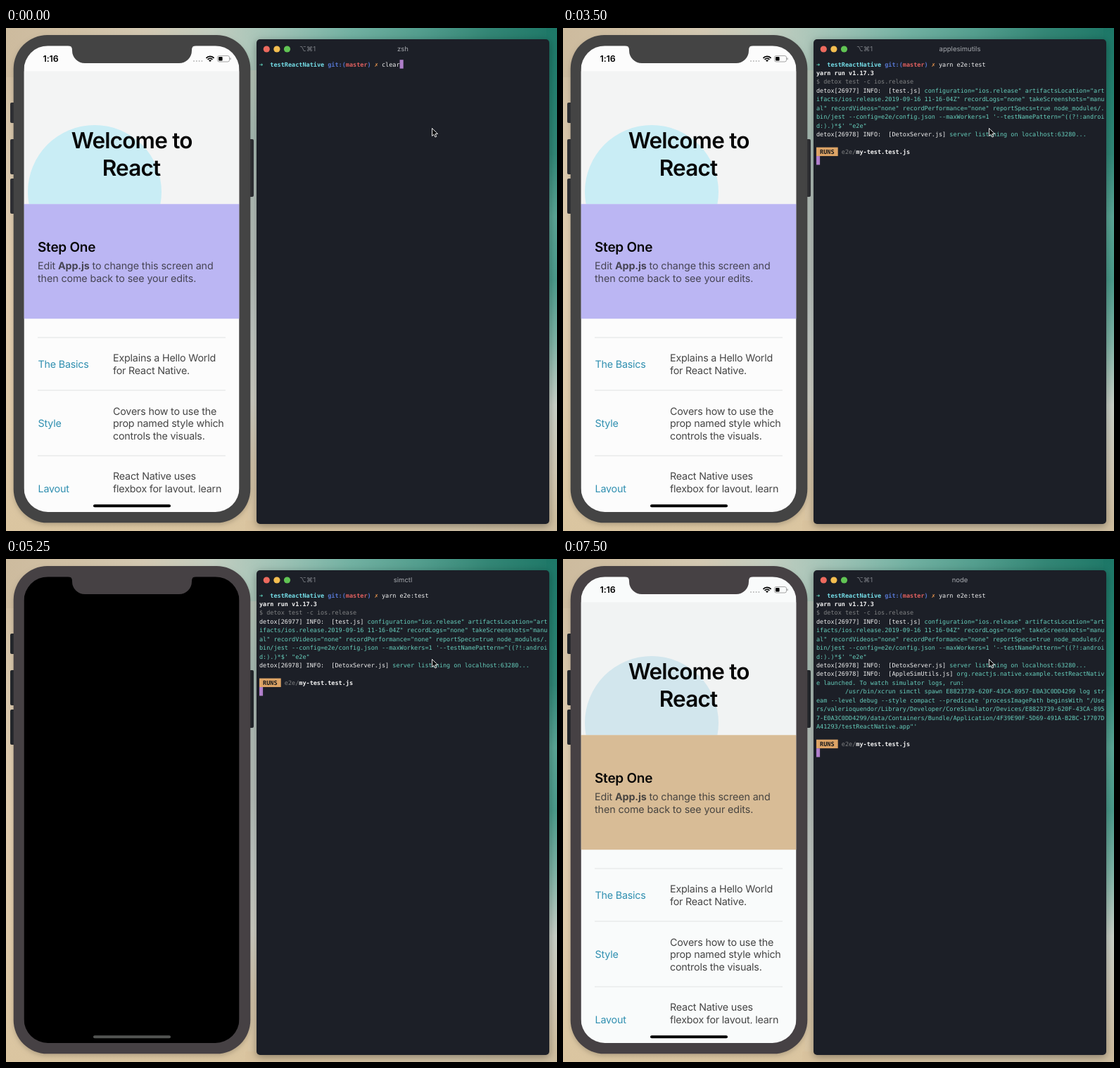
Animation of 783x715 px, one loop 8 s. Source, as an HTML page with a canvas:

```html
<!DOCTYPE html>
<html lang="en">
<head>
<meta charset="utf-8">
<title>End-to-end test run</title>
<style>
html, body { margin: 0; width: 100%; height: 100%; overflow: hidden; background: #d9c6a8; }
canvas { display: block; }
</style>
</head>
<body>
<canvas id="stage" width="783" height="715"></canvas>
<script>
const ctx = document.getElementById('stage').getContext('2d');
const LOOP = 8000;
const SANS = 'Inter, "Open Sans", sans-serif';
const MONO = '"DejaVu Sans Mono", monospace';
const COL = 5.117, ROW = 12.44, LEFT = 360, TOP = 45.2;
const SCREEN = { x: 25.5, y: 25.2, w: 306, h: 662.7 };
const C = {
  white: '#f0f0f0', teal: '#66cdbb', gray: '#7f8082', cursor: '#b07fcb',
  panel: '#1c1f27', badge: '#dda466'
};

// Last value whose start time has been reached.
const at = (steps, t) => steps.filter(([start]) => start <= t).pop()[1];

function gradient(x0, y0, x1, y1, colors) {
  const g = ctx.createLinearGradient(x0, y0, x1, y1);
  colors.forEach((c, i) => g.addColorStop(i / (colors.length - 1), c));
  return g;
}

function rect(x, y, w, h, fill, radius = 0) {
  ctx.fillStyle = fill;
  ctx.beginPath();
  ctx.roundRect(x, y, w, h, radius);
  ctx.fill();
}

// Full-width band of the phone screen.
const band = (y, h, fill) => rect(SCREEN.x, y, SCREEN.w, h, fill);

function disc(x, y, r, fill) {
  ctx.fillStyle = fill;
  ctx.beginPath();
  ctx.arc(x, y, r, 0, Math.PI * 2);
  ctx.fill();
}

function poly(fill, ...pts) {
  ctx.fillStyle = fill;
  ctx.beginPath();
  pts.forEach(([x, y]) => ctx.lineTo(x, y));
  ctx.closePath();
  ctx.fill();
}

function text(str, x, y, size, color, { weight = 400, spacing = 0, align = 'left', family = SANS } = {}) {
  ctx.font = `${weight} ${size}px ${family}`;
  ctx.letterSpacing = spacing + 'px';
  ctx.textAlign = align;
  ctx.fillStyle = color;
  ctx.fillText(str, x, y);
  return x + ctx.measureText(str).width;
}

function withShadow(blur, alpha, draw) {
  ctx.save();
  ctx.shadowColor = `rgba(0,0,0,${alpha})`;
  ctx.shadowBlur = blur;
  ctx.shadowOffsetY = 3;
  draw();
  ctx.restore();
}

function clipped(x, y, w, h, radius, draw) {
  ctx.save();
  ctx.beginPath();
  ctx.roundRect(x, y, w, h, radius);
  ctx.clip();
  draw();
  ctx.restore();
}

function drawBeach() {
  rect(0, 0, 783, 715, gradient(0, 0, 0, 715, ['#cdbb9e', '#d9c7ab', '#e0ccae', '#dfcaa9', '#dac5a0']));
  rect(0, 0, 783, 70, gradient(0, 0, 783, 0,
    ['#cdbb9e', '#d0c0a5', '#d3c8b2', '#c2cdc0', '#9dc2b5', '#72b1a2', '#539e8e', '#338675', '#1d7767']));
  rect(344, 60, 14, 655, gradient(0, 60, 0, 715,
    ['#bccabd', '#adc2b9', '#b8c4be', '#bcc4bf', '#c8cfca', '#d5d5cb', '#d9c9ae', '#dac5a1']));
  rect(768, 0, 15, 715, gradient(0, 0, 0, 715,
    ['#1d7767', '#24806f', '#318777', '#5aa595', '#4b9b8b', '#80b5a7', '#c9d0c7', '#d1c8b4', '#cfbd9c']));
  rect(340, 700, 443, 15, gradient(340, 0, 783, 0, ['#d9c39e', '#d8c4a2', '#d3c4a8', '#cfbea0']));
}

function drawWifi(x, y) {
  ctx.strokeStyle = '#000';
  ctx.lineWidth = 1.7;
  for (const r of [4.6, 7.6]) {
    ctx.beginPath();
    ctx.arc(x, y, r, -Math.PI * 0.76, -Math.PI * 0.24);
    ctx.stroke();
  }
  ctx.beginPath();
  ctx.moveTo(x, y);
  ctx.arc(x, y, 2.6, -Math.PI * 0.76, -Math.PI * 0.24);
  ctx.fillStyle = '#000';
  ctx.fill();
}

function drawStatusBar() {
  text('1:16', 52.5, 48, 12.4, '#000', { weight: 600, spacing: -0.1 });
  for (let i = 0; i < 4; i++) disc(267 + i * 3.8, 47, 1, '#b8b8b8');
  drawWifi(290, 48);
  ctx.strokeStyle = '#9a9a9a';
  ctx.lineWidth = 0.9;
  ctx.beginPath();
  ctx.roundRect(300.5, 39.5, 17, 8.5, 2.4);
  ctx.stroke();
  rect(302, 41, 5.6, 5.5, '#000', 1);
  rect(318.4, 42.2, 1.2, 3, '#9a9a9a', 0.6);
}

const TOPICS = [
  ['The Basics', 483, 440, ['Explains a Hello World', 'for React Native.'], 474],
  ['Style', 567, 515, ['Covers how to use the', 'prop named style which', 'controls the visuals.'], 549.5],
  ['Layout', 659.5, 608, ['React Native uses', 'flexbox for layout, learn'], 642]
];

function drawApp(relaunched) {
  const title = { weight: 600, spacing: -0.8, align: 'center' };
  band(SCREEN.y, SCREEN.h, relaunched ? '#f9fbfb' : '#fcfcfc');
  band(61.5, 189, relaunched ? '#f1f3f3' : '#f3f4f4');
  clipped(SCREEN.x, 61.5, SCREEN.w, 189, 0, () => disc(126, 233, 95, relaunched ? '#d2e6ed' : '#c9edf5'));
  text('Welcome to', 178.6, 171, 31.5, '#060606', title);
  text('React', 178, 210, 31.5, '#060606', title);

  band(250.3, 163, relaunched ? '#d8bc96' : '#bbb6f3');
  text('Step One', 45, 318, 19, '#060606', { weight: 600, spacing: -0.25 });
  const ink = relaunched ? '#474440' : '#464453';
  const intro = { spacing: -0.11 };
  let x = text('Edit ', 45, 343, 14.3, ink, intro);
  x = text('App.js', x, 343, 14.3, ink, { ...intro, weight: 700 });
  text(' to change this screen and', x, 343, 14.3, ink, intro);
  text('then come back to see your edits.', 45, 360.7, 14.3, ink, intro);

  clipped(SCREEN.x, 413, SCREEN.w, 247.5, 0, () => {
    const body = { spacing: -0.2 };
    for (const [name, nameY, ruleY, lines, y] of TOPICS) {
      rect(45, ruleY - 0.5, 267, 1, '#e2e3e3');
      text(name, 45.5, nameY, 14.3, '#2f8fb0', body);
      lines.forEach((line, i) => text(line, 152, y + i * 17.5, 14.3, '#454545', body));
    }
  });
  drawStatusBar();
  rect(124, 677.3, 110, 4, '#000', 2);
}

function drawWallpaper() {
  band(SCREEN.y, SCREEN.h, '#34282a');
  ctx.save();
  ctx.filter = 'blur(12px)';
  poly(gradient(0, 20, 0, 220, ['#060708', '#08090a', '#241d1e']), [180, 0], [360, 0], [360, 190], [235, 215]);
  poly(gradient(0, 25, 0, 375, ['#2c3b41', '#364f50', '#435354', '#4d4846', '#5a423d', '#59403a']),
    [0, 0], [130, 0], [215, 90], [240, 180], [212, 285], [148, 300], [128, 352], [0, 380]);
  poly('#272b35', [110, 10], [230, 10], [285, 100], [225, 150]);
  poly(gradient(26, 0, 332, 0, ['#4a3834', '#553e39', '#5d403c', '#65403f']),
    [0, 530], [120, 465], [225, 385], [360, 310], [360, 480], [200, 535], [0, 600]);
  poly(gradient(26, 560, 332, 688, ['#302e36', '#282d3a', '#283a42']),
    [0, 620], [200, 545], [360, 475], [360, 720], [0, 720]);
  poly(gradient(180, 660, 330, 560, ['#29414a', '#2e5657', '#356b66']),
    [360, 500], [275, 545], [195, 640], [165, 720], [360, 720]);
  poly('#2e434b', [0, 630], [80, 670], [130, 720], [0, 720]);
  ctx.filter = 'blur(6px)';
  poly('#523a35', [148, 280], [185, 290], [200, 300], [268, 306], [215, 317], [180, 325], [160, 365], [135, 350]);
  poly('#503a36', [225, 350], [265, 325], [292, 322], [268, 342]);
  ctx.restore();
  rect(124, 677.3, 110, 4, '#4a504e', 2);
}

function drawPhone(t) {
  const restarting = t >= 4000;
  const shell = restarting ? '#464144' : '#444444';
  const buttons = restarting ? '#25282d' : '#303136';
  for (const [x, y, h] of [[6, 106, 29], [6, 158, 50], [6, 214, 50], [344, 158, 82]]) {
    rect(x, y, 8, h, buttons, 2);
  }
  withShadow(6, 0.18, () => rect(10.7, 10, 336.6, 693.3, shell, 48));

  clipped(SCREEN.x, SCREEN.y, SCREEN.w, SCREEN.h, 34, () => {
    if (t < 4000 || t >= 7250) drawApp(restarting);
    else if (t >= 6750) drawWallpaper();
    else {
      band(SCREEN.y, SCREEN.h, '#000');
      if (t >= 4250) rect(124, 677.3, 110, 4, '#525452', 2);
    }
  });

  ctx.fillStyle = shell;
  ctx.beginPath();
  ctx.moveTo(87, 24);
  ctx.lineTo(88, 25);
  ctx.quadraticCurveTo(94, 25, 94, 31);
  ctx.arcTo(94, 50, 113, 50, 18);
  ctx.arcTo(264, 50, 264, 32, 18);
  ctx.lineTo(264, 31);
  ctx.quadraticCurveTo(264, 25, 270, 25);
  ctx.lineTo(271, 24);
  ctx.fill();
}

// Each run is [text, color, weight]; runs follow one another on the character grid.
function row(r, ...runs) {
  let col = 0;
  for (const [str, color, weight = 400] of runs) {
    text(str, LEFT + col * COL, TOP + r * ROW + 9.3, 8.5, color, { weight, family: MONO });
    col += str.length;
  }
}

const cursor = (r, col = 0) => rect(LEFT + col * COL, TOP + r * ROW, COL, ROW, C.cursor);

function runsBadge(r) {
  rect(LEFT, TOP + r * ROW, 6 * COL, ROW, C.badge);
  row(r, [' RUNS  ', '#17181b', 700], ['e2e/', C.gray], ['my-test.test.js', '#f4f4f4', 700]);
  cursor(r + 1);
}

const CONFIG = [
  'ifacts/ios.release.2019-09-16 11-16-04Z" recordLogs="none" takeScreenshots="manu',
  'al" recordVideos="none" recordPerformance="none" reportSpecs=true node_modules/.',
  "bin/jest --config=e2e/config.json --maxWorkers=1 '--testNamePattern=^((?!:androi",
  'd:).)*$\' "e2e"'
];
const LAUNCH = [
  'e launched. To watch simulator logs, run:',
  '        /usr/bin/xcrun simctl spawn E8823739-620F-43CA-8957-E0A3C0DD4299 log str',
  "eam --level debug --style compact --predicate 'processImagePath beginsWith \"/Use",
  'rs/valerioquendor/Library/Developer/CoreSimulator/Devices/E8823739-620F-43CA-895',
  '7-E0A3C0DD4299/data/Containers/Bundle/Application/4F39E90F-5D69-491A-B2BC-17707D',
  'A41293/testReactNative.app"\''
];
const TITLES = [[0, 'zsh'], [2250, 'node'], [3500, 'applesimutils'], [4250, 'simctl'], [7250, 'node']];

function drawOutput(t) {
  const command = t < 750 ? 'clear' : 'yarn e2e:test';
  row(0, ['➜  ', '#62dcc5', 700], ['testReactNative ', '#74dce6', 700], ['git:(', '#5576cf', 700],
    ['master', '#e0605f', 700], [') ', '#5576cf', 700], ['✗ ', '#f0994f', 700], [command, C.white]);
  if (t < 1500) return cursor(0, 34 + command.length);
  if (t < 1750) return cursor(1);

  row(1, ['yarn run v1.17.3', '#f4f4f4', 700]);
  row(2, ['$ detox test -c ios.release', C.gray]);
  if (t < 2000) return cursor(3);

  row(3, ['detox[26977] INFO:  [test.js] ', C.white],
    ['configuration="ios.release" artifactsLocation="art', C.teal]);
  CONFIG.forEach((line, i) => row(4 + i, [line, C.teal]));
  if (t < 2250) return cursor(8);
  if (t < 3000) return runsBadge(9);

  row(8, ['detox[26978] INFO:  [DetoxServer.js] ', C.white],
    ['server listening on localhost:63280...', C.teal]);
  if (t < 7000) return runsBadge(10);

  row(9, ['detox[26978] INFO:  [AppleSimUtils.js] ', C.white],
    ['org.reactjs.native.example.testReactNativ', C.teal]);
  LAUNCH.forEach((line, i) => row(10 + i, [line, C.teal]));
  runsBadge(17);
}

function drawTerminal(t) {
  withShadow(12, 0.35, () => rect(356, 16, 416, 689, C.panel, 5));
  ['#ed6a5e', '#f4be50', '#61c454'].forEach((c, i) => disc(370.3 + i * 14.6, 30, 4.6, c));
  text('⌥⌘1', 417, 33.4, 9.5, '#7f8288');
  text(at(TITLES, t), 564, 33.2, 9.5, '#a6a9ae', { align: 'center' });
  drawOutput(t);
}

function drawPointer(x, y) {
  const shape = [[0, 0], [0, 11], [2.6, 8.8], [4.4, 12.6], [6.2, 11.8], [4.5, 8], [8, 7.9]];
  poly('#08090b', ...shape.map(([dx, dy]) => [x + dx, y + dy]));
  ctx.strokeStyle = '#e6e6e6';
  ctx.lineWidth = 1;
  ctx.stroke();
}

function frame() {
  const t = performance.now() % LOOP;
  ctx.textRendering = 'geometricPrecision';
  drawBeach();
  drawPhone(t);
  drawTerminal(t);
  drawPointer(605.5, 142.5);
  requestAnimationFrame(frame);
}
frame();
</script>
</body>
</html>
```
